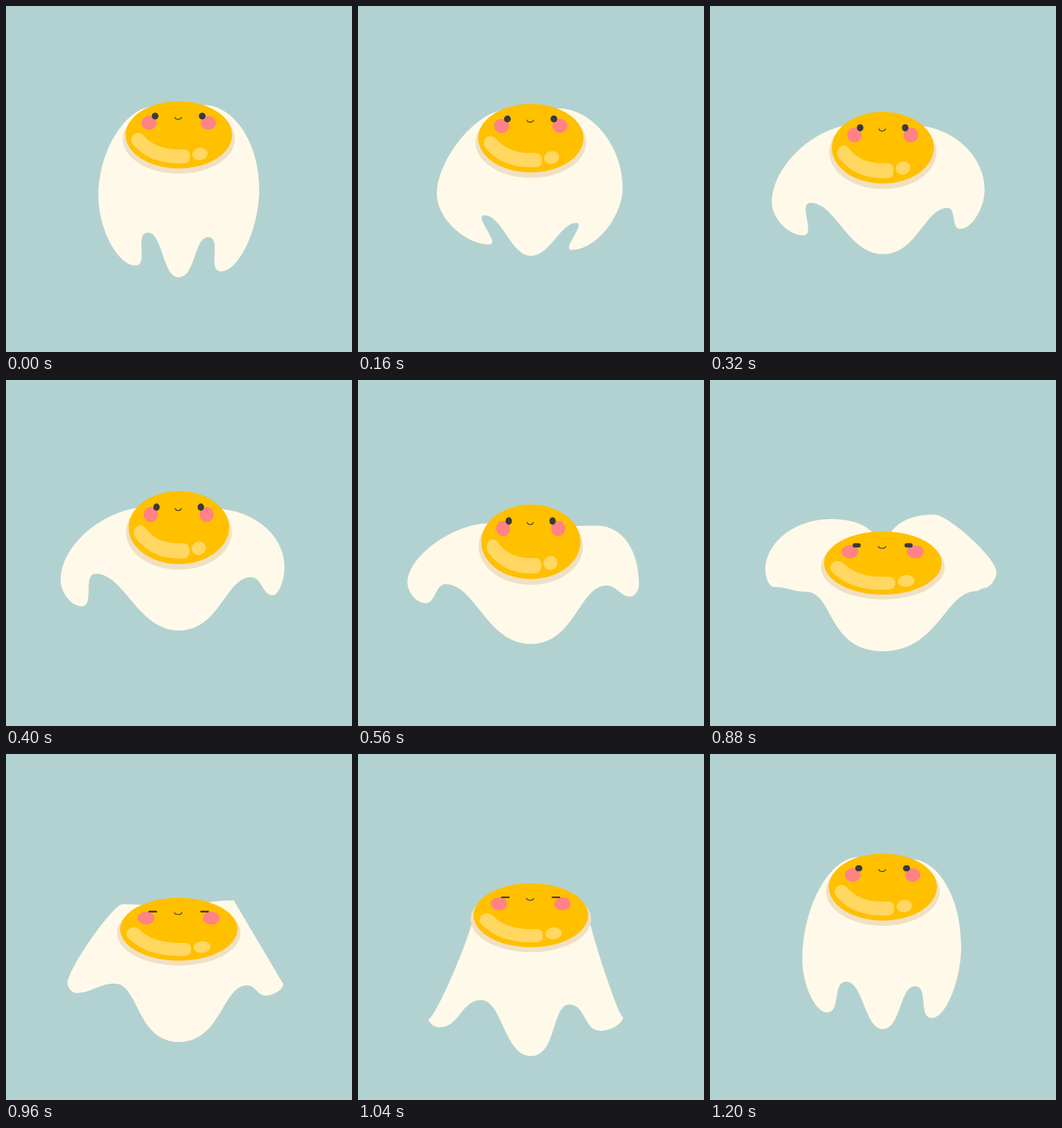
These frames come from a looping animation (500 by 500 pixels, 1280 ms). An HTML page:

```html
<!DOCTYPE html>
<html lang="en">
<head>
<meta charset="utf-8">
<title>Jumping egg</title>
<style>
  html, body { margin: 0; width: 100%; height: 100%; overflow: hidden; background: #b2d2d1; }
  svg { display: block; width: 100%; height: 100%; }
</style>
</head>
<body>
<svg viewBox="0 0 500 500">
  <path id="white" fill="#fff9e9"/>
  <g id="yolk">
    <ellipse cy="6" rx="81" ry="50" fill="#f0e0c4"/>
    <ellipse rx="77" ry="48.5" fill="#ffc000"/>
    <g fill="#ffd761">
      <path d="M-59 7Q-37 33 6 31" fill="none" stroke="#ffd761" stroke-width="20" stroke-linecap="round"/>
      <rect x="-4" y="21" width="20" height="20" rx="8"/>
      <ellipse cx="30.5" cy="27.5" rx="11" ry="9" transform="rotate(-8 30.5 27.5)"/>
    </g>
    <g fill="#ff8285">
      <ellipse cx="-43" cy="-17.3" rx="11" ry="10"/>
      <ellipse cx="42.5" cy="-17.3" rx="11" ry="10"/>
    </g>
    <rect class="eye" fill="#3a3a3a"/>
    <rect class="eye" fill="#3a3a3a"/>
    <path d="M-6 -26C-5 -21.5 3 -21.5 4 -26" fill="none" stroke="#3a3a3a" stroke-width="1.2"/>
  </g>
</svg>
<script>
const LOOP = 1280, STEP = 80, CENTRE = 249.8;
const white = document.getElementById('white');
const yolk = document.getElementById('yolk');
const eyes = document.querySelectorAll('.eye');

// yolk: centre y, radius x, radius y; hem: lowest y, half width of its curve
// sides: x,y of crest, outermost point, leg tip and notch, then the bulge
const poses = [
  { time: 0, yolk: [186.3, 77, 48.5], hem: [392, 24],
    right: [285, 143, 366, 265, 311, 383.5, 292, 334, 0.55],
    left: [215, 145, 133.5, 275, 187, 375, 205, 327.5, 0.51] },
  { time: 160, yolk: [191, 76, 49.6], hem: [361, 28],
    right: [290, 148, 382.5, 262, 309, 352.5, 315, 313.5, 0.52],
    left: [215, 150, 114, 272, 190, 344.5, 183, 302.5, 0.42] },
  { time: 400, yolk: [213.2, 72.6, 52.7], hem: [362, 59],
    right: [300, 186, 402.5, 270, 386, 311, 354, 285, 0.55],
    left: [210, 183, 79, 290, 109, 327, 130, 280, 0.5] },
  { time: 560, yolk: [233.9, 71.7, 53.8], hem: [381.5, 63],
    right: [345, 210.5, 406, 296, 394, 313, 359, 297, 0.6],
    left: [190, 207, 71.5, 293, 97, 322.5, 127, 295, 0.44] },
  { time: 880, yolk: [264.5, 85, 45.6], hem: [392, 80],
    right: [324, 194.5, 414, 277, 395, 301, 385, 305, 0.23],
    left: [175, 201, 80, 275, 92, 299, 139, 306, 0.55] },
  { time: 1040, yolk: [233, 82.8, 46.2], hem: [436.5, 38],
    right: [331, 222, 383, 380, 350, 400, 305.5, 362, -0.13],
    left: [169, 225, 102, 383, 118, 395, 178, 355.5, -0.15] },
  { time: 1200, yolk: [192.3, 78.1, 48.4], hem: [397.5, 26],
    right: [290, 152, 363, 278, 321, 381.5, 296, 335.5, 0.55],
    left: [215, 149, 133.5, 298, 169, 373.5, 197, 329, 0.52] }
];

// pose by index, wrapping around the loop
function poseAt(i) {
  const n = poses.length, turn = Math.floor(i / n), p = poses[i - turn * n];
  return { ...p, time: p.time + turn * LOOP };
}

// returns a reader that blends one part along a Hermite spline through the poses
function blender(t) {
  let i = poses.length - 1;
  while (poses[i].time > t) i--;
  const [a, b, c, d] = [-1, 0, 1, 2].map(k => poseAt(i + k));
  const span = c.time - b.time, u = (t - b.time) / span, v = 1 - u;
  return part => b[part].map((from, k) => {
    const to = c[part][k];
    const m0 = (to - a[part][k]) / (c.time - a.time) * span;
    const m1 = (d[part][k] - from) / (d.time - b.time) * span;
    return (1 + 2 * u) * v * v * from + u * v * v * m0
         + u * u * (3 - 2 * u) * to - u * u * v * m1;
  });
}

// Bezier points from the crest down one side to the hem; dir points inward
function sideCurve(values, hem, dir) {
  const [cx, cy, sx, sy, tx, ty, nx, ny, bulge] = values;
  const [bottom, width] = hem;
  const round = Math.max(bulge, 0), flare = Math.max(-bulge, 0), leg = 0.47;
  const curl = dir * 0.4 * Math.hypot(tx - nx, ty - ny);
  const slope = dir * 0.28 * Math.hypot(CENTRE - nx, bottom - ny);
  return [
    [cx, cy],
    [cx + (sx - cx) * round, cy + (sy - cy) * flare],
    [sx + (cx - sx) * flare, sy + (cy - sy) * round],
    [sx, sy],
    [sx, sy + (ty - sy) * leg], [tx + (sx - tx) * leg, ty], [tx, ty],
    [tx + curl, ty], [nx - curl, ny], [nx, ny],
    [nx + slope, ny], [CENTRE - dir * width, bottom], [CENTRE, bottom]
  ];
}

function whitePath(right, left, hem, dip) {
  const down = sideCurve(right, hem, -1);
  const up = sideCurve(left, hem, 1).reverse().slice(1);
  const [start, ...rest] = down.concat(up).map(p => p.map(s => s.toFixed(2)).join(' '));
  return `M${start}C${rest.join(' ')}`
       + `Q${CENTRE} ${left[1]} ${CENTRE} ${dip}Q${CENTRE} ${right[1]} ${start}Z`;
}

function setAttrs(node, attrs) {
  for (const name in attrs) node.setAttribute(name, attrs[name]);
}

function draw(t) {
  const blend = blender(t);
  const [cy, rx, ry] = blend('yolk');
  white.setAttribute('d', whitePath(blend('right'), blend('left'), blend('hem'), cy));
  yolk.setAttribute('transform', `translate(${CENTRE} ${cy}) scale(${rx / 77} ${ry / 48.5})`);

  // one blink per loop; the eyes widen as they close
  const blink = Math.exp(-(((t - 1010) / 131) ** 2));
  const h = 9.7 - 7.9 * blink, w = 9.9 + 2 * blink;
  eyes.forEach((eye, i) => setAttrs(eye, {
    x: (i ? 33.7 : -34.3) - w / 2, y: -27.2 - h / 2,
    width: w, height: h, rx: Math.min(w, h) / 2
  }));
}

function tick() {
  draw(Math.floor(performance.now() % LOOP / STEP) * STEP);
  requestAnimationFrame(tick);
}
tick();
</script>
</body>
</html>
```
